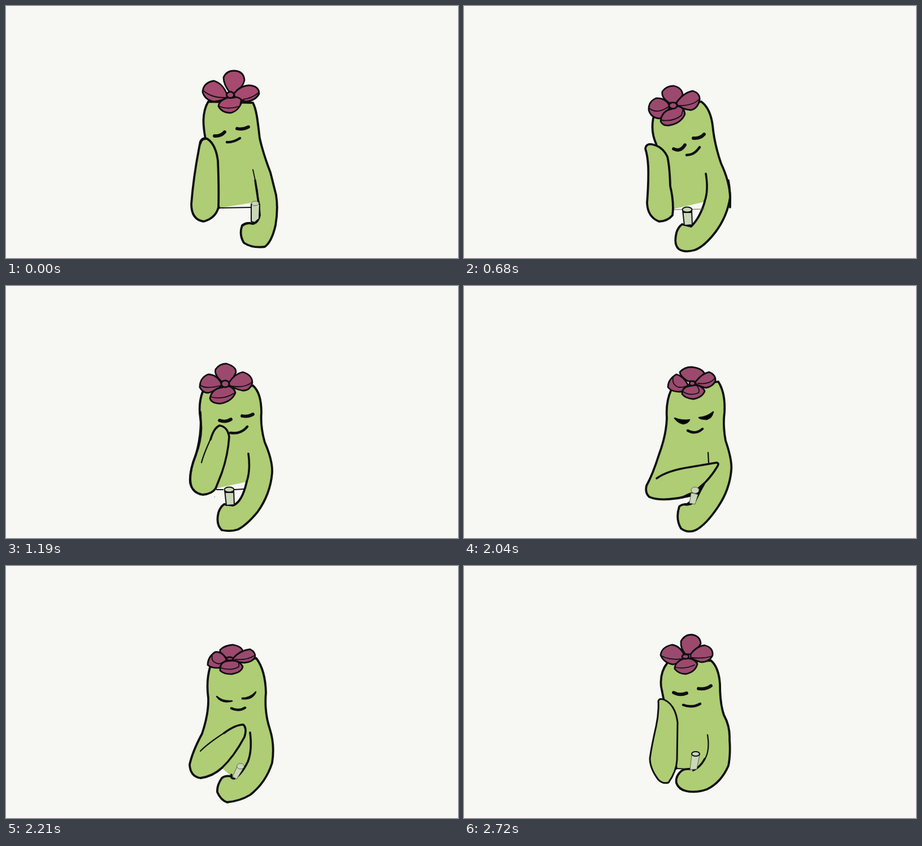
An HTML page without scripts for the animation above (2.89 s loop, 800 by 448 pixels).

```html
<!DOCTYPE html>
<html lang="en">
<head>
<meta charset="utf-8">
<title>Sleepy cactus</title>
<style>
html, body { margin: 0; width: 100%; height: 100%; overflow: hidden; background: #f7f7f3; }
svg { display: block; width: 100vw; height: 100vh; }
path, ellipse { stroke: #0f0f12; stroke-linecap: round; stroke-linejoin: round; }
.skin { fill: #aecd74; stroke-width: 3.8; }
.line { fill: none; stroke-width: 3.6; }
.thin { fill: none; stroke-width: 2.2; }
.faint { fill: none; stroke: #59654a; stroke-width: 1; }
.eye { fill: none; stroke-width: 5.8; }
.lid { stroke-width: 2.6; }
.mouth { fill: none; stroke-width: 4.4; }
.stick { fill: #cad6b8; stroke-width: 2; }
.soft { stroke-width: 1; stroke: #5a6350; }
.gap { fill: #f7f7f3; stroke: none; }
.flower { fill: #9b4a6e; stroke-width: 2.8; }
.bright { fill: #a74a70; }
.fold { fill: none; stroke-width: 1.8; }

/* The loop is 17 beats of 170 ms; --t is the first beat of a pose. */
.pose {
  visibility: hidden;
  animation: one 2890ms step-end infinite;
  animation-delay: calc((var(--t) - 17) * 170ms);
}
.two { animation-name: two; }
.three { animation-name: three; }
@keyframes one { 0% { visibility: visible } 5.88235%, 100% { visibility: hidden } }
@keyframes two { 0% { visibility: visible } 11.76471%, 100% { visibility: hidden } }
@keyframes three { 0% { visibility: visible } 17.64706%, 100% { visibility: hidden } }
</style>
</head>
<body>
<svg viewBox="0 0 800 448">
<defs>
  <g id="restArm">
    <path class="skin" d="M344 241Q348 233 356 236Q371 245 375 275Q377 320 376 358Q371 377 350 383Q328 380 328 352Q332 300 344 241Z"/>
  </g>
  <g id="flowerUp" class="flower">
    <path d="M392 157Q383 147 384 134Q390 122 403 122Q418 124 419 138Q414 148 402 157Z"/>
    <path d="M390 158Q382 142 368 140Q350 144 348 158Q353 172 370 175Q384 172 390 164Z"/>
    <path d="M401 157Q412 142 426 141Q441 145 440 158Q436 170 420 171Q408 168 401 163Z"/>
    <path d="M388 165Q372 172 373 183Q380 192 393 192Q410 188 413 174Q408 165 397 164Z"/>
    <path class="fold" d="M350 160Q365 168 388 165M440 160Q425 165 403 163M374 180Q390 184 408 176"/>
    <ellipse cx="392" cy="161" rx="6" ry="4"/>
  </g>
  <g id="flowerLow" class="flower">
    <path d="M396 169Q382 160 382 153Q390 144 403 144Q420 146 425 154Q422 164 410 170Z"/>
    <path d="M396 175Q388 160 376 157Q361 166 361 180Q368 189 384 188Q394 184 398 177Z"/>
    <path d="M410 170Q422 155 434 153Q446 158 445 169Q440 179 428 181Q416 178 410 174Z"/>
    <path d="M398 178Q386 180 386 192Q392 200 406 201Q422 198 426 187Q422 177 410 176Z"/>
    <path class="fold" d="M370 163Q368 176 380 180Q392 181 397 175M445 163Q435 176 414 173M388 188Q400 196 415 190Q418 184 412 177"/>
    <ellipse cx="404" cy="173" rx="5" ry="4"/>
  </g>
  <g id="flowerFlat" class="flower">
    <path d="M388 162Q375 154 377 148Q385 140 400 139Q415 142 417 150Q410 158 400 163Z"/>
    <path d="M387 163Q380 150 368 152Q355 161 355 175Q362 181 375 180Q386 174 389 166Z"/>
    <path d="M400 163Q412 149 430 147Q440 152 439 161Q434 170 420 171Q407 170 400 166Z"/>
    <path d="M389 168Q376 170 377 185Q385 192 398 191Q415 188 417 178Q412 168 400 167Z"/>
    <path class="fold" d="M363 158Q360 170 375 173Q385 170 388 165M438 158Q425 167 404 165M378 180Q398 186 410 178Q411 172 408 168"/>
    <ellipse cx="394" cy="164" rx="6" ry="3"/>
  </g>
  <g id="lowFace">
    <path class="lid" d="M373 235Q384 240 399 238Q396 244 388 245Q379 243 373 235Z"/>
    <path class="lid" d="M416 234Q430 233 441 224Q438 235 430 237Q420 237 416 234Z"/>
    <path class="mouth" d="M396 257Q410 265 422 254"/>
  </g>
  <g id="flatFace">
    <path class="lid" d="M373 232Q382 241 400 240Q382 245 373 232Z"/>
    <path class="lid" d="M418 235Q432 235 442 224Q436 238 418 236Z"/>
    <path class="mouth" d="M399 253Q412 259 423 252"/>
  </g>
  <g id="lowStick">
    <path class="stick" d="M387 363L390 390L404 389L403 363Z"/>
    <ellipse class="stick" cx="395" cy="362" rx="8.5" ry="4.5"/>
    <path class="fold" d="M388 367L403 367"/>
  </g>
</defs>

<g class="pose" style="--t:0">
  <path class="skin" d="M447 348L449 372Q446 386 436 387Q426 384 418 390Q412 406 421 421Q436 431 458 428Q470 420 477 390Q482 360 478 336L468 296Q455 262 449 235C446 210 444 185 437 172L358 170C346 190 349 215 353 236L377 359"/>
  <path class="thin" d="M377 359L435 358"/>
  <path class="fold" d="M437 291L445 328L447 350"/>
  <path class="line" d="M441 310L447 350M418 391Q426 384 438 387"/>
  <path class="stick" d="M434 352L434 383L440 385L448 378L449 352Z"/>
  <ellipse class="stick soft" cx="441" cy="351" rx="6.5" ry="4"/>
  <use href="#restArm"/>
  <path class="line" d="M344 245Q346 235 355 236"/>
  <g class="flower bright">
    <path d="M397 155Q385 140 385 127Q390 115 404 115Q421 116 422 132Q419 146 404 155Z"/>
    <path d="M391 157Q384 138 368 133Q349 136 348 153Q352 167 368 170Q384 168 391 162Z"/>
    <path d="M404 155Q414 142 430 141Q448 142 448 156Q442 168 425 170Q410 166 404 160Z"/>
    <path d="M393 163Q377 168 376 178Q382 190 398 190Q413 186 418 168Q410 160 403 163Z"/>
    <path class="fold" d="M349 150Q362 163 388 163M447 154Q436 164 420 166M377 178Q392 185 414 178L416 166"/>
    <ellipse cx="397" cy="158" rx="6.5" ry="5.5"/>
  </g>
  <path class="eye" d="M369 231Q380 232 387 224M409 218Q420 220 429 215"/>
  <path class="mouth" d="M391 242Q402 243 414 235"/>
</g>

<g class="pose three" style="--t:1">
  <path class="skin" d="M436 352Q432 377 420 389Q405 386 397 393Q390 408 399 424Q412 434 434 431Q456 420 466 392Q476 365 475 340L464 300Q450 262 446 235Q444 190 432 172L356 174Q341 195 344 220Q346 232 350 242L374 360"/>
  <path class="thin" d="M376 360L436 360M433 295Q439 325 436 352"/>
  <path class="stick" d="M411 358L412 387L420 389L427 381L426 358Z"/>
  <ellipse class="stick" cx="418" cy="357" rx="7.5" ry="4.3"/>
  <use href="#restArm" x="-1" y="2"/>
  <use href="#flowerUp" x="-5" y="1"/>
  <path class="eye" d="M368 239Q380 241 389 233M406 225Q418 227 427 220"/>
  <path class="mouth" d="M391 252Q404 254 415 243"/>
</g>

<g class="pose three" style="--t:4">
  <path class="skin" d="M426 348Q418 376 402 392L386 388Q379 393 376 403Q371 424 380 432Q390 439 408 434Q425 428 445 402Q466 374 471 340Q470 312 455 280Q443 245 440 212Q436 182 420 170L338 188Q328 218 340 245L370 361"/>
  <path class="faint" d="M372 362L425 361"/>
  <path class="line" d="M428 298Q433 328 426 347M468 310Q472 330 471 358"/>
  <use href="#lowStick"/>
  <path class="skin" d="M321 254Q322 244 333 246Q352 250 360 268Q364 285 365 320Q372 350 369 372Q360 383 345 383Q325 375 324 350Q327 310 326 285Q325 266 321 254Z"/>
  <g class="flower">
    <path d="M363 172Q349 163 351 152Q358 142 371 142Q386 145 387 158Q382 168 374 173Z"/>
    <path d="M363 176Q356 163 340 164Q326 170 327 185Q331 199 346 200Q358 196 363 181Z"/>
    <path d="M376 172Q388 154 405 151Q418 155 417 167Q414 182 402 185Q388 184 378 177Z"/>
    <path d="M368 183Q350 186 348 205Q352 214 364 212Q385 208 391 192Q389 178 376 178Z"/>
    <path class="fold" d="M328 182Q342 193 362 179M417 165Q405 178 379 177M349 203Q372 206 385 194L388 183"/>
    <ellipse cx="370" cy="177" rx="7" ry="5.5"/>
  </g>
  <path class="eye" d="M371 254Q383 260 391 247M406 235Q418 236 425 228"/>
  <path class="mouth" d="M394 265Q408 265 417 251"/>
</g>

<g class="pose two" style="--t:7">
  <path class="skin" d="M426 348Q418 384 402 390L386 388Q379 393 376 403Q371 424 382 434Q398 437 410 433Q425 426 445 402Q468 370 471 332Q472 310 458 278Q450 250 452 225Q452 190 437 177L348 188Q340 210 344 235Q349 265 336 300Q324 330 326 350Q330 368 348 371Q364 370 371 360"/>
  <path class="thin" d="M373 362L384 362M404 362L421 361"/>
  <path class="line" d="M371 360L382 332Q393 300 395 268Q392 250 378 248Q368 252 362 273M429 298Q433 328 426 348"/>
  <path class="thin" d="M364 268Q350 298 346 314"/>
  <path class="line" d="M344 224Q347 262 336 300Q322 336 328 356"/>
  <use href="#lowStick"/>
  <path class="faint" d="M369 375h.5"/>
  <g class="flower">
    <path d="M382 170Q368 158 371 148Q378 138 390 138Q407 143 407 153Q404 163 394 172Z"/>
    <path d="M381 173Q374 158 358 157Q343 163 343 180Q348 190 358 190Q372 186 381 178Z"/>
    <path d="M395 171Q405 156 419 153Q436 158 436 172Q432 186 419 186Q404 183 395 176Z"/>
    <path d="M384 180Q364 182 361 200Q364 209 380 209Q400 205 406 190Q404 180 393 178Z"/>
    <path class="fold" d="M344 176Q352 184 380 177M436 170Q425 182 398 178M362 197Q385 203 405 190"/>
    <ellipse cx="388" cy="174" rx="7" ry="6"/>
  </g>
  <path class="eye" d="M378 239Q389 243 398 237M418 231Q429 233 437 228"/>
  <path class="mouth" d="M397 261Q416 264 427 250"/>
</g>

<g class="pose three" style="--t:9">
  <path class="skin" d="M428 348Q418 380 402 390L388 388Q380 393 378 403Q374 424 384 433Q398 438 410 433Q428 425 450 392Q470 362 473 328Q473 308 463 275Q458 248 461 225Q463 190 450 170L367 184Q357 205 359 235Q358 265 345 300Q330 335 325 353Q326 372 348 375Q366 372 378 362"/>
  <path class="thin" d="M378 362L424 361"/>
  <path class="line" d="M378 362Q400 338 418 304Q423 286 416 280Q404 280 384 296M432 296Q436 328 428 348"/>
  <path class="thin" d="M390 291Q360 311 345 326"/>
  <use href="#lowStick" x="4"/>
  <use href="#flowerLow"/>
  <use href="#lowFace"/>
</g>

<g class="pose" style="--t:12">
  <path class="skin" d="M398 388Q386 387 381 392Q374 414 384 431Q396 440 410 434Q428 425 450 392Q470 362 473 328Q475 310 463 275Q458 248 461 225Q463 190 450 170L367 184Q357 205 359 235Q358 265 345 300Q334 335 323 355Q320 368 328 375Q345 382 372 378Q388 377 403 369"/>
  <path class="line" d="M341 342Q360 328 400 322L447 314Q453 315 447 323Q440 335 428 348L408 366"/>
  <path class="lid" d="M427 349Q417 366 410 382Q402 391 390 389Q402 385 405 375Q413 364 427 349Z"/>
  <path class="lid" d="M384 377Q397 369 406 367L403 373Z"/>
  <path class="thin" d="M432 296L433 314"/>
  <path class="stick soft" d="M402 368L399 386L409 388L414 371Z"/>
  <ellipse class="stick soft" cx="409" cy="363" rx="7" ry="5.5"/>
  <use href="#flowerLow"/>
  <use href="#lowFace"/>
</g>

<g class="pose" style="--t:13">
  <path class="skin" d="M399 374Q388 372 382 377Q373 390 374 402Q380 416 391 420Q414 418 432 407Q460 385 471 350Q476 318 467 290Q457 260 460 225Q459 185 443 164L361 180Q354 205 358 235Q359 262 347 298Q330 330 325 353Q326 374 344 377Q366 374 382 359"/>
  <path class="line" d="M382 359Q404 338 422 304Q427 288 420 282Q406 282 386 297M432 296Q436 328 428 348Q416 372 404 378Q397 378 399 371"/>
  <path class="thin" d="M392 293Q360 313 344 329"/>
  <path class="stick soft" d="M409 357L401 374L408 379L419 361Z"/>
  <ellipse class="stick soft" cx="415" cy="356" rx="6.5" ry="5"/>
  <use href="#flowerFlat" x="2" y="1"/>
  <use href="#flatFace"/>
</g>

<g class="pose two" style="--t:14">
  <path class="skin" d="M398 359Q388 359 382 366Q371 378 369 388Q376 402 388 408Q425 403 448 390Q466 372 471 345Q475 320 470 305Q460 275 458 250Q462 220 457 200Q452 170 438 160L359 178Q352 195 356 225Q361 245 357 268Q347 295 335 320Q326 340 328 358Q333 376 348 378Q368 372 382 352"/>
  <path class="gap" d="M383 354L410 352L402 358L388 359L374 368L378 360Z"/>
  <path class="line" d="M380 356L388 340L405 302Q408 290 405 270Q402 256 397 252M433 297Q436 326 428 348Q418 366 405 371Q396 370 398 361"/>
  <path class="thin" d="M397 252Q390 254 372 280Q355 302 345 320"/>
  <path class="stick soft" d="M401 362L415 345L425 352L408 368Z"/>
  <ellipse class="stick soft" cx="420" cy="348" rx="6.5" ry="4.5" transform="rotate(40 420 348)"/>
  <path class="faint" d="M433 125h6" opacity=".4"/>
  <use href="#flowerFlat"/>
  <use href="#flatFace"/>
</g>

<g class="pose" style="--t:16">
  <path class="skin" d="M400 361Q388 360 382 367Q374 376 376 386Q380 397 393 400Q410 404 430 397Q455 385 468 355Q472 335 470 308Q471 285 460 265Q453 245 453 210Q451 180 437 168L360 172Q346 190 349 215Q352 230 354 240L376 360"/>
  <path class="thin" d="M377 360L395 361"/>
  <path class="thin" d="M431 300Q435 325 428 340Q418 358 405 364"/>
  <path class="line" d="M426 343Q418 358 406 363"/>
  <path class="stick soft" d="M403 336L400 362L412 361L417 336Z"/>
  <ellipse class="stick" cx="410" cy="334" rx="7" ry="4"/>
  <path class="skin" style="stroke-width:3" d="M344 240Q346 234 355 238Q374 247 378 278L377 345Q376 365 362 385Q352 388 344 380Q329 360 329 342Q332 320 340 285Q345 262 344 240Z"/>
  <use href="#flowerUp"/>
  <path class="eye" d="M371 225Q382 231 394 226M415 218Q428 220 437 213"/>
  <path class="mouth" d="M388 247Q404 253 418 245"/>
</g>
</svg>
</body>
</html>
```
